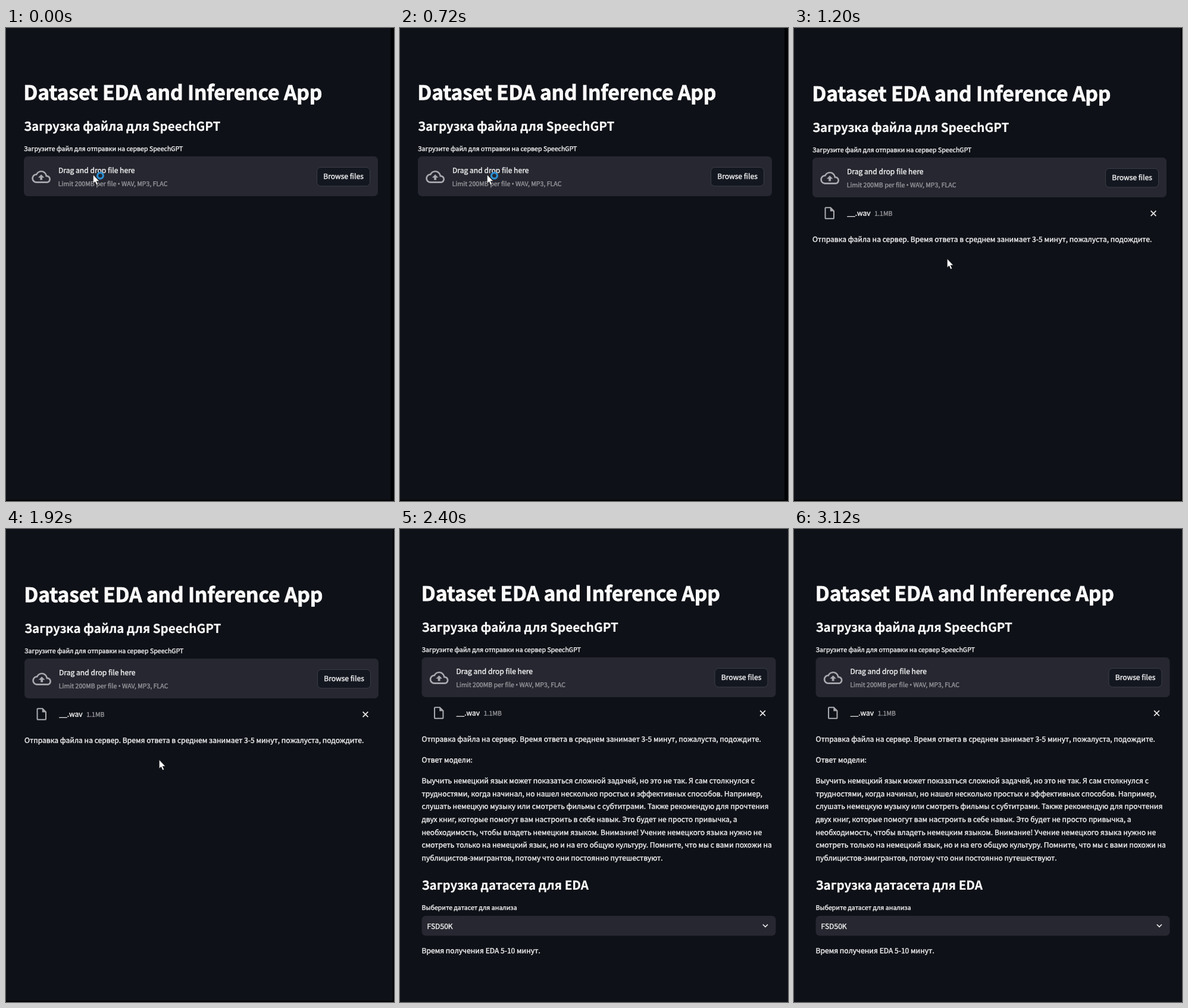
Animation of 652x796 px, one loop 3600 ms. Source, as an HTML page:

```html
<!DOCTYPE html>
<html lang="ru">
<head>
<meta charset="utf-8">
<style>
  html, body { margin: 0; width: 100%; height: 100%; overflow: hidden; background: #0e1117; }
  svg { display: block; }
  text {
    font: 12.1px "Noto Sans CJK SC", "Noto Sans CJK JP", "Noto Sans CJK", "Noto Sans", sans-serif;
    fill: #f0f0f1; stroke: #f0f0f1; stroke-width: .4px;
    text-rendering: geometricPrecision; white-space: pre;
  }
  .title, .head { font-weight: 700; letter-spacing: -.005em; fill: #fafafa; stroke: #fafafa; }
  .title { font-size: 33.65px; stroke-width: .8px; }
  .head { font-size: 20.65px; stroke-width: .2px; }
  .small { font-size: 10.6px; }
  .dim { fill: #94949a; stroke: #94949a; }
  .bullet { font-family: "Noto Sans", sans-serif; }
  .panel { fill: #262730; }
  .icon { fill: #a9aab0; }
  .line { fill: none; stroke: #f0f0f1; stroke-width: 1.6; }
</style>
</head>
<body>
<svg width="652" height="796" viewBox="0 0 652 796">
  <g id="page">
    <text class="title" x="29.3" y="121">Dataset EDA and Inference App</text>
    <text class="head" x="30" y="173">Загрузка файла для SpeechGPT</text>
    <text class="small" x="30" y="206.5">Загрузите файл для отправки на сервер SpeechGPT</text>

    <rect class="panel" x="30" y="216" width="595" height="67" rx="6.5"/>
    <path class="icon" transform="translate(43.3 234.6) scale(1.32)" d="M19.35 10.04C18.67 6.59 15.64 4 12 4 9.11 4 6.6 5.64 5.35 8.04 2.34 8.36 0 10.91 0 14c0 3.31 2.69 6 6 6h13c2.76 0 5-2.24 5-5 0-2.64-2.05-4.78-4.65-4.96zM19 18H6c-2.21 0-4-1.79-4-4 0-2.05 1.53-3.76 3.56-3.97l1.07-.11.5-.95C8.08 7.14 9.94 6 12 6c2.62 0 4.88 1.86 5.39 4.43l.3 1.5 1.53.11c1.56.1 2.78 1.41 2.78 2.96 0 1.65-1.35 3-3 3zM8 13h2.55v3h2.9v-3H16l-4-4z"/>
    <text x="88" y="244.3">Drag and drop file here</text>
    <text class="small dim" x="87.8" y="266">Limit 200MB per file <tspan class="bullet">•</tspan> WAV, MP3, FLAC</text>
    <rect x="522.5" y="234.5" width="89" height="31.5" rx="6.5" fill="#131720" stroke="#3b3d46"/>
    <text x="567" y="254.2" text-anchor="middle">Browse files</text>

    <g id="upload">
      <path class="icon" transform="translate(46.4 297.2) scale(1.03)" d="M14 2H6c-1.1 0-2 .9-2 2v16c0 1.1.9 2 2 2h12c1.1 0 2-.9 2-2V8zM6 20V4h7v5h5v11z"/>
      <text x="88.3" y="313.5">__.wav</text>
      <text class="small dim" x="134.2" y="313.5">1.1MB</text>
      <path class="line" d="M598.6 305.6l8.8 8.8m0-8.8l-8.8 8.8"/>
      <text x="30" y="358">Отправка файла на сервер. Время ответа в среднем занимает 3-5 минут, пожалуста, подождите.</text>
    </g>

    <g id="answer">
      <text x="30" y="392.5">Ответ модели:</text>
      <g id="paragraph"></g>
      <text class="head" x="30" y="607">Загрузка датасета для EDA</text>
      <text class="small" x="30" y="641">Выберите датасет для анализа</text>
      <rect class="panel" x="30" y="651" width="595" height="33.5" rx="6.5"/>
      <text x="39" y="672.5">FSD50K</text>
      <path class="line" d="M603.3 665.5l4.1 4.1 4.1-4.1"/>
      <text x="30" y="713.5">Время получения EDA 5-10 минут.</text>
    </g>
  </g>

  <rect id="edge" y="0" width="8" height="796" fill="#020305"/>
  <rect id="floor" y="794" width="652" height="2" fill="#020305"/>
  <g id="cursor">
    <path d="M0 0v14.5l3.2-3 2.5 5.7 2.4-1-2.5-5.5h4.5z" fill="#fff" stroke="#111" stroke-width=".5"/>
    <circle id="busy" cx="12" cy="1.5" r="4.9" fill="none" stroke="#2b8fd2" stroke-width="3.2"/>
  </g>
</svg>
<script>
const $ = id => document.getElementById(id);
const show = (id, on) => $(id).setAttribute('display', on ? 'inline' : 'none');
const move = (id, x, y) => $(id).setAttribute('transform', `translate(${x} ${y})`);

const paragraph = [
  'Выучить немецкий язык может показаться сложной задачей, но это не так. Я сам столкнулся с',
  'трудностями, когда начинал, но нашел несколько простых и эффективных способов. Например,',
  'слушать немецкую музыку или смотреть фильмы с субтитрами. Также рекомендую для прочтения',
  'двух книг, которые помогут вам настроить в себе навык. Это будет не просто привычка, а',
  'необходимость, чтобы владеть немецким языком. Внимание! Учение немецкого языка нужно не',
  'смотреть только на немецкий язык, но и на его общую культуру. Помните, что мы с вами похожи на',
  'публицистов-эмигрантов, потому что они постоянно путешествуют.'
];
$('paragraph').innerHTML = paragraph
  .map((line, i) => `<text x="30" y="${428 + i * 21.65}">${line}</text>`).join('');

const STEP = 1200;
const scenes = [
  { page: [0, 0], cursor: [146.5, 247], edge: 646 },
  { page: [1, 2], cursor: [257.5, 388.5], edge: 650 },
  { page: [6.5, 0], cursor: [0, 0], edge: 652 }
];

function draw(now) {
  const step = Math.floor(now / STEP) % scenes.length;
  const scene = scenes[step];
  move('page', ...scene.page);
  move('cursor', ...scene.cursor);
  move('edge', scene.edge, 0);
  show('upload', step > 0);
  show('answer', step > 1);
  show('cursor', step < 2);
  show('floor', step < 2);
  show('busy', step === 0);
}

const start = performance.now();
function tick() {
  draw(performance.now() - start);
  requestAnimationFrame(tick);
}
tick();
</script>
</body>
</html>
```
